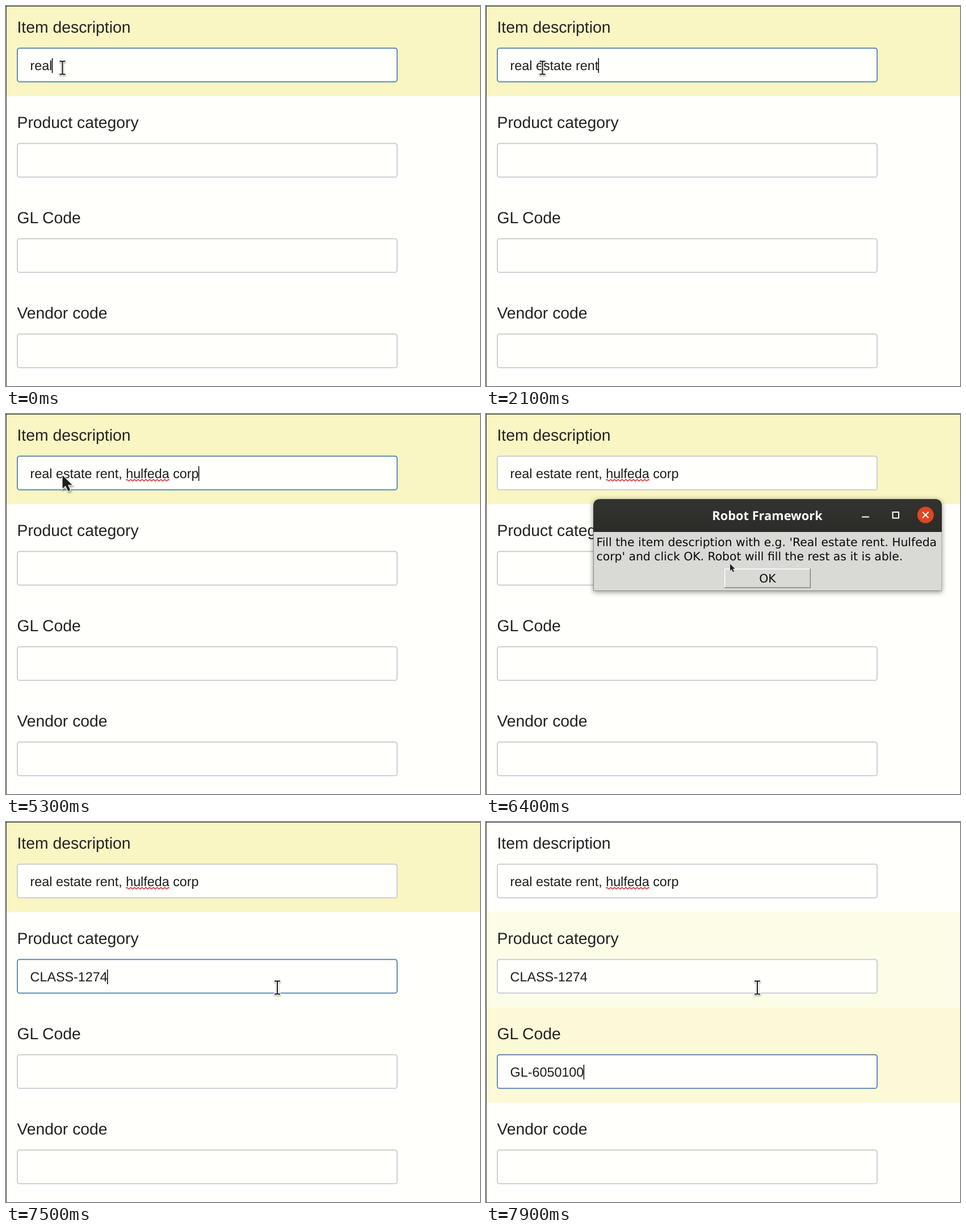
Animation of 835 by 670 pixels, one loop 8 s. Source, as an HTML page:

```html
<!DOCTYPE html>
<html lang="en">
<head>
<meta charset="utf-8">
<title>Form filling</title>
<style>
  html, body { margin: 0; width: 100%; height: 100%; overflow: hidden; background: #fffffc; }
  svg { display: block; width: 835px; height: 670px; }
  text { text-rendering: geometricPrecision; white-space: pre; }
  .row { fill: #f9f6c3; }
  .label { font: 28.33px "Liberation Sans", Arial, sans-serif; fill: #222; }
  .value { font: 23.33px "Liberation Sans", Arial, sans-serif; fill: #1c1c1c; }
  .field { fill: #fffffc; stroke: #c6c8ce; stroke-width: 1.7; }
  .field.on { stroke: #4d7dab; }
  .wave { fill: none; stroke: #c81e2a; stroke-width: 1.5; }
  .title { font: bold 21.8px "Noto Sans", sans-serif; fill: #fff; text-anchor: middle; }
  .msg { font: 20.35px "DejaVu Sans", sans-serif; fill: #0a0a0a; }
  .icon { fill: none; stroke: #fff; stroke-width: 2; }
  #dialog { filter: drop-shadow(0 2px 5px rgba(0, 0, 0, .45)); }
  .ibeam { fill: none; stroke-linecap: square; }
</style>
</head>
<body>
<svg viewBox="0 0 835 670">
  <defs>
    <path id="beam" d="M-4 -11.5H-1.5Q0 -11.5 0 -10V10Q0 11.5 -1.5 11.5H-4M4 -11.5H1.5Q0 -11.5 0 -10M0 10Q0 11.5 1.5 11.5H4"/>
    <path id="tip" d="M0 0V23.5L5.5 18.5L9.8 28L13.8 26.2L9.6 17H17Z"/>
    <linearGradient id="bar" x2="0" y2="1">
      <stop offset="0" stop-color="#33332f"/>
      <stop offset="1" stop-color="#2b2b28"/>
    </linearGradient>
  </defs>

  <g id="form"></g>
  <path class="wave" id="wave"/>
  <rect id="caret" width="1.5" height="26" fill="#000"/>
  <path d="M0 .5H835M.5 0V670" stroke="#3a3a3a" fill="none"/>

  <g id="dialog">
    <path d="M189 312V163Q189 150 202 150H790Q803 150 803 163V312Z" fill="#8f8f8b"/>
    <path d="M189 208V163Q189 150 202 150H790Q803 150 803 163V208Z" fill="url(#bar)"/>
    <rect x="190" y="208" width="612.5" height="103" fill="#d9d9d6"/>
    <text class="title" x="495.5" y="187">Robot Framework</text>
    <path class="icon" d="M662 181.5H675M716.5 173H727V183.5H716.5Z"/>
    <circle cx="774.3" cy="178" r="14.5" fill="#dc4721"/>
    <path class="icon" d="M769 172.700L779.600 183.300M779.600 172.700L769 183.300"/>
    <text class="msg" x="194.500" y="232.500">Fill the item description with e.g. 'Real estate rent. Hulfeda</text>
    <text class="msg" x="194.500" y="257.500">corp' and click OK. Robot will fill the rest as it is able.</text>
    <rect id="button" x="420" y="272.500" width="152" height="34.500"/>
    <path id="lit" d="M420.700 307V273.200H572" fill="none" stroke-width="1.500"/>
    <path id="shade" d="M420 306.300H571.300V272.500" fill="none" stroke-width="1.500"/>
    <text class="msg" x="496" y="297" text-anchor="middle">OK</text>
  </g>

  <g id="ibeam" class="ibeam">
    <use href="#beam" stroke="#fff" stroke-width="4.500" style="filter:drop-shadow(0 1px 1px rgba(0,0,0,.4))"/>
    <use href="#beam" stroke="#111" stroke-width="1.900"/>
  </g>
  <g id="arrow">
    <use href="#tip" fill="#1d1d1d" stroke="#fff" stroke-width="2.600" paint-order="stroke" style="filter:drop-shadow(1px 2px 1.500px rgba(0,0,0,.45))"/>
  </g>
  <g id="pointer">
    <use href="#tip" fill="#1d1d1d" transform="scale(.5)"/>
  </g>
</svg>
<script>
const LOOP = 8000, STEP = 168, TEXT_X = 42.6;
const $ = id => document.getElementById(id);
const labels = ["Item description", "Product category", "GL Code", "Vendor code"];
const phrase = "real estate rent, hulfeda corp";

// Each track is a list of [start ms, value]; values hold until the next start.
const typed = [[0, 4], [300, 5], [400, 6], [700, 7], [800, 8], [900, 9], [1200, 11], [1500, 12],
  [1800, 14], [1900, 15], [2100, 16], [2300, 17], [2500, 18], [2600, 20], [2700, 21], [3000, 22],
  [3200, 24], [3400, 25], [3600, 26], [4100, 27], [4700, 28], [4800, 29], [5000, 30]];
const focus = [[0, 0], [5400, -1], [7500, 1], [7700, -1], [7800, 2]];
const glow = [[0, [1, 0, 0]], [7600, [.6, .4, 0]], [7700, [.25, .75, 0]],
  [7800, [.08, .7, .3]], [7900, [0, .38, .62]]];
const cursor = [[0, ["ibeam", 99.5, 109]], [5300, ["arrow", 99.5, 108]], [5400, ["ibeam", 99.5, 109]],
  [5800, ["ibeam", 159.5, 129]], [6000, ["pointer", 390, 263.5]], [6400, ["pointer", 430, 264.5]],
  [6500, ["pointer", 455, 276]], [6600, ["pointer", 472, 287]], [6700, ["pointer", 478, 292]],
  [7200, ["ibeam", 478, 292]]];
const dialog = [[0, 0], [5400, 1], [7100, .5], [7200, 0]];
const button = [[0, "idle"], [6500, "hover"], [7000, "down"]];

const at = (track, t) => track.reduce((v, [start, next]) => t >= start ? next : v, track[0][1]);

$("form").innerHTML = labels.map((label, i) => {
  const y = i * STEP;
  const top = i ? y - 9 : 0;
  return `<rect class="row" x="0" y="${top}" width="835" height="${y + 159 - top}" opacity="0"/>
    <text class="label" x="19.5" y="${y + 46.500}">${label}</text>
    <rect class="field" x="20" y="${y + 74.300}" width="669" height="59.400" rx="4"/>
    <text class="value" x="${TEXT_X}" y="${y + 113}"></text>`;
}).join("");

const all = name => [...document.querySelectorAll(name)];
const rows = all(".row"), fields = all(".field"), values = all(".value");

let wave = "M211.5 116.800";
for (let i = 0; i < 23; i++) wave += `q1.660 ${i % 2 ? 2.600 : -2.600} 3.320 0`;
$("wave").setAttribute("d", wave);

const set = (el, attrs) => {
  for (const key in attrs) el.setAttribute(key, attrs[key]);
};
const write = (el, text) => {
  if (el.textContent !== text) el.textContent = text;
};

function draw(t) {
  const count = at(typed, t), active = at(focus, t), tint = at(glow, t);
  write(values[0], phrase.slice(0, count));
  write(values[1], t >= 7500 ? "CLASS-1274" : "");
  write(values[2], t >= 7800 ? "GL-6050100" : "");
  rows.forEach((row, i) => set(row, { opacity: tint[i] || 0 }));
  fields.forEach((field, i) => field.classList.toggle("on", i === active));
  set($("wave"), { visibility: count >= 26 ? "visible" : "hidden" });

  set($("caret"), { visibility: active < 0 ? "hidden" : "visible" });
  if (active >= 0) set($("caret"), {
    x: TEXT_X + values[active].getComputedTextLength() - .7,
    y: active * STEP + 92
  });

  const shown = at(dialog, t), state = at(button, t), down = state === "down";
  set($("dialog"), { opacity: shown, visibility: shown ? "visible" : "hidden" });
  set($("button"), { fill: state === "idle" ? "#d9d9d6" : "#ececea" });
  set($("lit"), { stroke: down ? "#828280" : "#fff" });
  set($("shade"), { stroke: down ? "#fff" : "#828280" });

  const [shape, x, y] = at(cursor, t);
  for (const id of ["ibeam", "arrow", "pointer"])
    set($(id), { visibility: id === shape ? "visible" : "hidden", transform: `translate(${x} ${y})` });
}

function tick() {
  draw(performance.now() % LOOP);
  requestAnimationFrame(tick);
}
tick();
</script>
</body>
</html>
```
